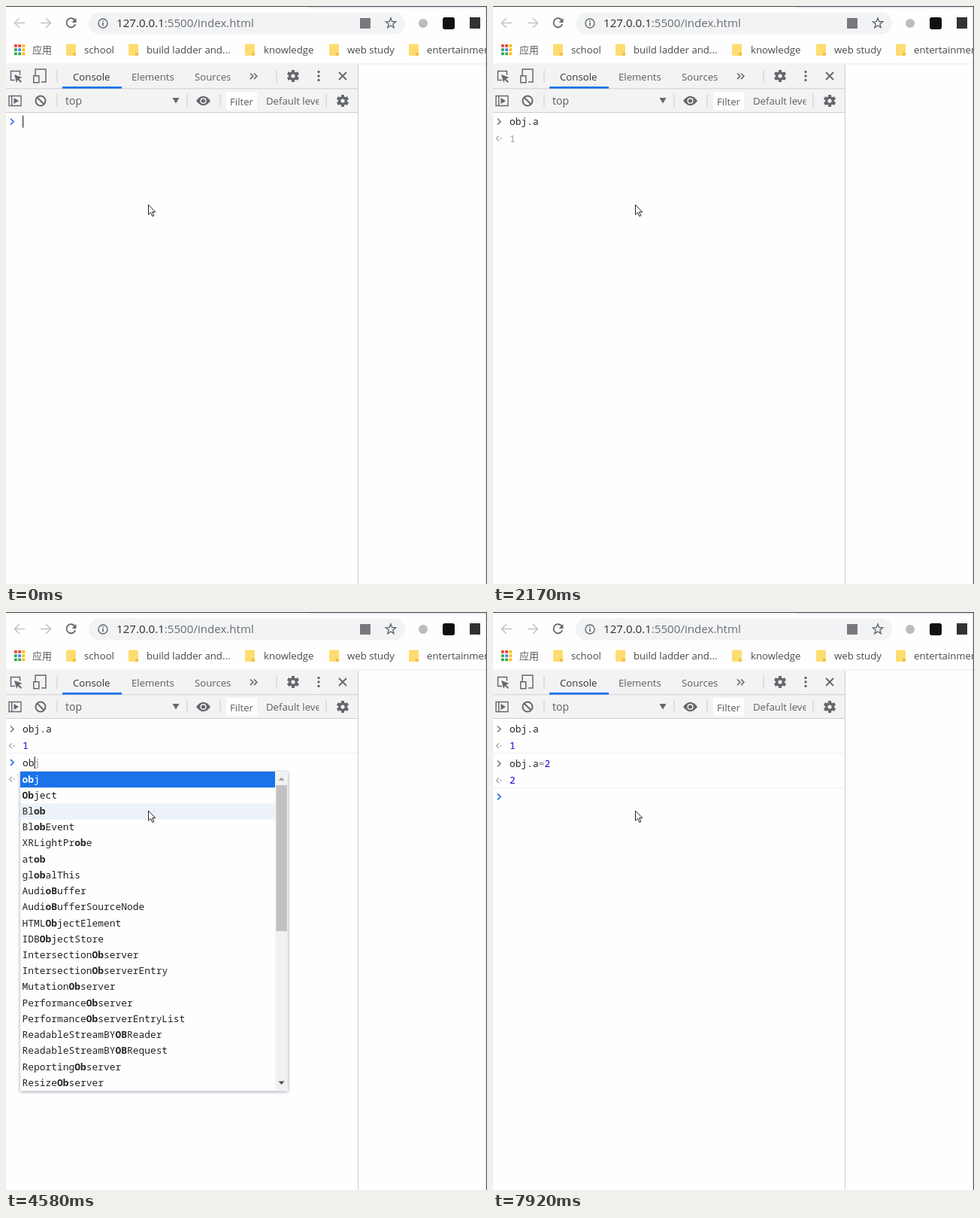
Write an HTML page that moves like this. It is 640 px wide and 768 px high and loops after 8000 ms.

```html
<!DOCTYPE html>
<html lang="en">
<head>
<meta charset="utf-8">
<style>
html, body { margin: 0; width: 100%; height: 100%; overflow: hidden; background: #fefefe; }
svg { display: block; width: 100vw; height: 100vh; }
text { font: 13.2px "Open Sans", "Noto Sans", sans-serif; fill: #5a5d62; white-space: pre; }
.mono text { font: 12.92px "Noto Sans Mono", "DejaVu Sans Mono", monospace; fill: #222; }
.mono .b { font-weight: 700; }
.popup { filter: drop-shadow(0 1px 2px rgba(50, 50, 90, .5)); }
</style>
</head>
<body>
<svg viewBox="0 0 640 768" preserveAspectRatio="none">
  <g id="chrome"></g>
  <g id="console" class="mono"></g>
  <path d="M189.5 264v13.2l3-2.8 2.3 5 2-.9-2.2-4.8h4.2z" fill="#fff" stroke="#222" stroke-width="1"/>
</svg>
<script>
const LOOP = 8000, CHAR = 7.752, ROW = 21.22, POINTER_Y = 264;
const BAR = '#f3f3f4', PAGE = '#fefefe', INK = '#222', BLUE = '#1a73e8', GREY = '#65686c';
const EDGE = '#cdced6', FAINT = '#a8a8ac';

const $ = id => document.getElementById(id);
const rect = (x, y, w, h, fill, r = 0) =>
  `<rect x="${x}" y="${y}" width="${w}" height="${h}" rx="${r}" fill="${fill}"/>`;
const line = (d, color, w = 1.5, extra = '') =>
  `<path d="${d}" fill="none" stroke="${color}" stroke-width="${w}" ${extra}/>`;
const disc = (x, y, r, fill) => `<circle cx="${x}" cy="${y}" r="${r}" fill="${fill}"/>`;
const ring = (x, y, r, color, w = 1.5) =>
  `<circle cx="${x}" cy="${y}" r="${r}" fill="none" stroke="${color}" stroke-width="${w}"/>`;
const text = (x, y, s, attrs = '') => `<text x="${x}" y="${y}" ${attrs}>${s}</text>`;
const ink = color => `style="fill:${color}"`;
const chevron = (x, y, color, w = 1.8) => line(`M${x} ${y - 4}l4 4-4 4`, color, w);

function gear(x, y) {
  let teeth = '';
  for (let i = 0; i < 6; i++)
    teeth += `<rect x="-2" y="-8" width="4" height="16" rx=".6" transform="rotate(${i * 60})" fill="${GREY}"/>`;
  return `<g transform="translate(${x} ${y})">${teeth}${disc(0, 0, 6, GREY)}${disc(0, 0, 2.6, BAR)}</g>`;
}

function star(x, y) {
  const pts = Array.from({ length: 10 }, (_, i) => {
    const r = i % 2 ? 3 : 7, a = i * Math.PI / 5 - Math.PI / 2;
    return `${(x + r * Math.cos(a)).toFixed(2)} ${(y + r * Math.sin(a)).toFixed(2)}`;
  });
  return line(`M${pts.join('L')}z`, GREY, 1.4);
}

function browserBar() {
  const folders = [[80, 104, 'school'], [163, 187, 'build ladder and...'], [318, 343, 'knowledge'],
    [430, 454, 'web study'], [536, 560, 'entertainment']];
  const dots = ['#ea4335', '#ea4335', '#fbbc04', '#34a853', '#4285f4', '#fbbc04', '#34a853', '#34a853', '#fbbc04'];
  return rect(0, 0, 640, 768, PAGE) + rect(0, 0, 640, 1, '#444') +
    rect(0, 1, 403, 1.6, BAR) + rect(403, 1, 237, 1.6, '#dee1e6') +
    line('M25 22.5H12M18 16l-6.5 6.5L18 29', '#c2c3c5') +
    line('M46 22.5h13M53 16l6.5 6.5L53 29', '#c2c3c5') +
    line('M91.5 18.8A6 6 0 1 0 92.3 24', GREY, 1.8) + `<path d="M93.5 16v6h-6z" fill="${GREY}"/>` +
    rect(110, 8.5, 421, 29, '#f1f3f4', 14.5) +
    ring(129, 23, 6, GREY, 1.4) + rect(128.2, 22, 1.6, 4.4, GREY) + rect(128.2, 19.4, 1.6, 1.6, GREY) +
    text(147, 28.3, '127.0.0.1<tspan fill="#6a6d71">:5500/index.html</tspan>', 'style="font-size:15.1px;fill:#2b2d30"') +
    rect(471, 16, 14, 14, '#77797d', 1) + star(512, 23) +
    disc(555, 23, 6, '#bcbcbc') + rect(581, 15, 16, 16, '#111', 3) + rect(617, 15, 14, 15, '#333') +
    dots.map((c, i) => rect(11 + i % 3 * 5.2, 51 + Math.floor(i / 3) * 5.2, 3.8, 3.8, c, .5)).join('') +
    text(35, 63, '应用', 'style="font-family:\'Noto Sans CJK SC\',\'Noto Sans CJK\',sans-serif;font-size:13px"') +
    folders.map(([x, tx, s]) => rect(x, 50.5, 13, 15.5, '#ffdc70', 1.5) +
      `<path d="M${x + 9} 66v-4h4v2.5q0 1.5-1.5 1.5z" fill="#f0bf45"/>` + text(tx, 63, s, ink('#46494d'))).join('') +
    rect(0, 76.5, 640, 1, '#ebebee');
}

function toolsBar() {
  const seps = [[68, 93], [360, 93], [68, 125], [241, 125], [285, 125], [426, 125]];
  return rect(0, 78, 468, 63.5, BAR) + rect(0, 109.3, 468, 1, EDGE) + rect(0, 141, 468, 1, EDGE) +
    rect(468, 78, 1, 690, EDGE) +
    seps.map(([x, y]) => rect(x - .5, y - 8, 1, 17, '#ccc')).join('') +
    line('M12 98.5H6.5v-12h12v5', GREY) + `<path d="M11 91l10.5 4-4.2 1.7 3.7 3.8-1.5 1.4-3.7-3.8-1.6 4z" fill="${GREY}"/>` +
    line('M39 92v-8h14v17h-6M36.8 92.7h7v9h-7z', GREY) +
    text(89, 99, 'Console', ink('#333')) + text(167, 99, 'Elements') + text(251, 99, 'Sources') +
    rect(75, 107, 79, 2.7, BLUE) +
    line('M325 89.5l3.8 3.8-3.8 3.8M330 89.5l3.8 3.8-3.8 3.8', GREY, 1.6) +
    gear(382, 93) + [87.5, 93, 98.5].map(y => disc(416, y, 1.7, GREY)).join('') +
    line('M443 88l10 10M453 88l-10 10', GREY, 1.9) +
    line('M4 119.5h16v13H4zM7.7 119.5v13', GREY, 1.4) + `<path d="M10.5 122l6.5 4-6.5 4z" fill="${GREY}"/>` +
    ring(46, 126, 6.5, GREY, 2) + line('M41.5 121.5l9 9', GREY, 2) +
    text(79, 131, 'top', 'style="font-size:14px"') + `<path d="M221.5 122h9l-4.5 7.5z" fill="${GREY}"/>` +
    `<path d="M253 126q9.5-12.5 19 0q-9.5 12.5-19 0z" fill="${GREY}"/>` + disc(262.5, 126, 4.1, BAR) + disc(262.5, 126, 2.6, GREY) +
    rect(293, 114, 41, 24, PAGE, 1) + text(298, 131.5, 'Filter') +
    '<clipPath id="level"><path d="M340 112h76.5v28H340z"/></clipPath>' +
    text(346, 131, 'Default levels', 'clip-path="url(#level)"') + gear(448, 126);
}

const LISTS = {
  o: `obj Object open opener origin originAgentCluster outerHeight outerWidth onabort onafterprint
    onanimationend onblur oncancel onchange onclick onclose ondrag onerror onfocus oninput`,
  ob: `obj Object Blob BlobEvent XRLightProbe atob globalThis AudioBuffer AudioBufferSourceNode
    HTMLObjectElement IDBObjectStore IntersectionObserver IntersectionObserverEntry MutationObserver
    PerformanceObserver PerformanceObserverEntryList ReadableStreamBYOBReader
    ReadableStreamBYOBRequest ReportingObserver ResizeObserver`,
  obj: 'obj Object HTMLObjectElement IDBObjectStore',
  'obj.': `a _a constructor hasOwnProperty isPrototypeOf propertyIsEnumerable toLocaleString toString
    valueOf __defineGetter__ __defineSetter__ __lookupGetter__ __lookupSetter__ __proto__`
};

// Bold the part of a name that matches the typed letters.
function matched(name, key) {
  const i = name.toLowerCase().indexOf(key);
  if (!key || i < 0) return name;
  const j = i + key.length;
  return `${name.slice(0, i)}<tspan class="b">${name.slice(i, j)}</tspan>${name.slice(j)}`;
}

function popup(typed, top, second) {
  const members = typed === 'obj.';
  const names = LISTS[typed].split(/\s+/);
  const past = members
    ? [...(second ? ['a', 'a=2'] : ['a=2', 'a']), '2', '_a', 'haha.apply(this);', 'haha.apply();'] : [];
  const count = names.length + past.length, h = count * ROW;
  const x = members ? 50 : 19, scroll = count >= 20, w = scroll ? 339 : 356;
  const hover = Math.floor((POINTER_Y - top) / ROW);
  let out = `<g class="popup">${rect(x, top, 356, h, PAGE)}</g>`;
  if (past.length) out += rect(x, top + names.length * ROW, w, past.length * ROW, '#f4f4f5');
  if (hover < count) out += rect(x, top + hover * ROW, w, ROW, '#ecf2f8');
  out += rect(x, top, w, ROW, BLUE);
  names.forEach((name, i) => {
    out += text(x + 2.5, top + i * ROW + 14.6, matched(name, members ? '' : typed), i ? '' : ink('#fff'));
  });
  past.forEach((s, i) => {
    const y = top + (names.length + i) * ROW;
    out += chevron(56, y + 10, '#3b7de0', 1.6) + text(363, y + 14.6, s, 'text-anchor="end"');
  });
  if (members) out += text(383, top + 2 * ROW + 14.6, 'Object', `text-anchor="end" ${ink(FAINT)}`);
  if (scroll) {
    const sx = x + 339, thumb = { o: 120, ob: 194, 'obj.': 368 }[typed];
    out += rect(sx, top, 17, h, '#f1f1f2') + rect(sx + 1.5, top + 18, 14.5, thumb, '#c1c1c1') +
      `<path d="M${sx + 4.5} ${top + 12}h8l-4-4.5z" fill="#a3a3a3"/>` +
      `<path d="M${sx + 4.5} ${top + h - 13}h8l-4 4.5z" fill="#505050"/>`;
  }
  return out;
}

// Start, typed text, grey completion, popup key, preview value.
const KEYS = [
  [0, ''], [80, 'o'], [250, 'o', 'bj', 'o'], [580, 'ob', 'j', 'ob', ' '], [830, 'obj', '', 'obj', '{_a: 1}'],
  [1170, 'obj.', 'a', 'obj.', '{_a: 1}'], [1420, 'obj.', 'a', 'obj.', '1'],
  [1670, 'obj.a', '', 'obj.', '1'], [1750, 'obj.a', '', '', '1'],
  [3080, ''], [4000, 'o'], [4170, 'o', 'bj', 'o'], [4580, 'ob', 'j', 'ob', ' '], [4750, 'obj', '', 'obj', '{_a: 1}'],
  [5170, 'obj.', 'a', 'obj.', '{_a: 1}'], [5420, 'obj.', 'a', 'obj.', '1'],
  [5580, 'obj.a', '', 'obj.', '1'], [5670, 'obj.a', '', '', '1'],
  [6330, 'obj.a='], [6580, 'obj.a=2'], [7000, '']
];
const ENTERS = [3080, 7000];
const PROMPT_Y = [153.7, 200, 245.5];

const code = s => s.replace(/=(\d?)/, '<tspan fill="#808080">=</tspan><tspan fill="#1c00cf">$1</tspan>');
const arrow = y => line(`M8 ${y - 3.5}l-3.5 3.5 3.5 3.5`, FAINT, 1.3) + disc(10.5, y, 1, FAINT);

function entry(i) {
  const y = 155.5 + i * 46;
  return chevron(6, y, '#727272', 1.5) + text(22, y + 4.5, code(['obj.a', 'obj.a=2'][i])) +
    arrow(y + 22.3) + text(22, y + 26.8, i + 1, ink('#1c00cf')) +
    rect(0, y + 31.5, 468, 1, '#eeeef0');
}

function draw(t) {
  const [, typed, ghost = '', list = '', preview = ''] = KEYS.findLast(k => k[0] <= t);
  const [pressed] = KEYS.findLast((k, i) => k[0] <= t && k[1] !== KEYS[i - 1]?.[1]);
  const done = ENTERS.filter(e => e <= t).length;
  const y = PROMPT_Y[done], end = 22 + typed.length * CHAR;
  let out = '';
  for (let i = 0; i < done; i++) out += entry(i);
  out += chevron(6, y, typed.startsWith('obj.') ? '#7f8795' : '#367cf1');
  out += text(22, y + 4.5, code(typed)) + text(end, y + 4.5, ghost, ink('#9a9a9a'));
  if (preview) out += arrow(y + 22.3) + text(22, y + 26.8, preview, ink('#a0a0a4'));
  if (list) out += popup(list, Math.round(y + 12.1), done > 0);
  if ((t - pressed) % 1000 < 500) out += rect(end + .1, y - 8, 1.1, 16, INK);
  return out;
}

$('chrome').innerHTML = browserBar() + toolsBar() + rect(638.8, 0, 1.2, 768, '#555');

let shown, start;
function frame(now) {
  start ??= now;
  const next = draw((now - start) % LOOP);
  if (next !== shown) $('console').innerHTML = shown = next;
  requestAnimationFrame(frame);
}
$('console').innerHTML = shown = draw(0);
requestAnimationFrame(frame);
</script>
</body>
</html>
```
